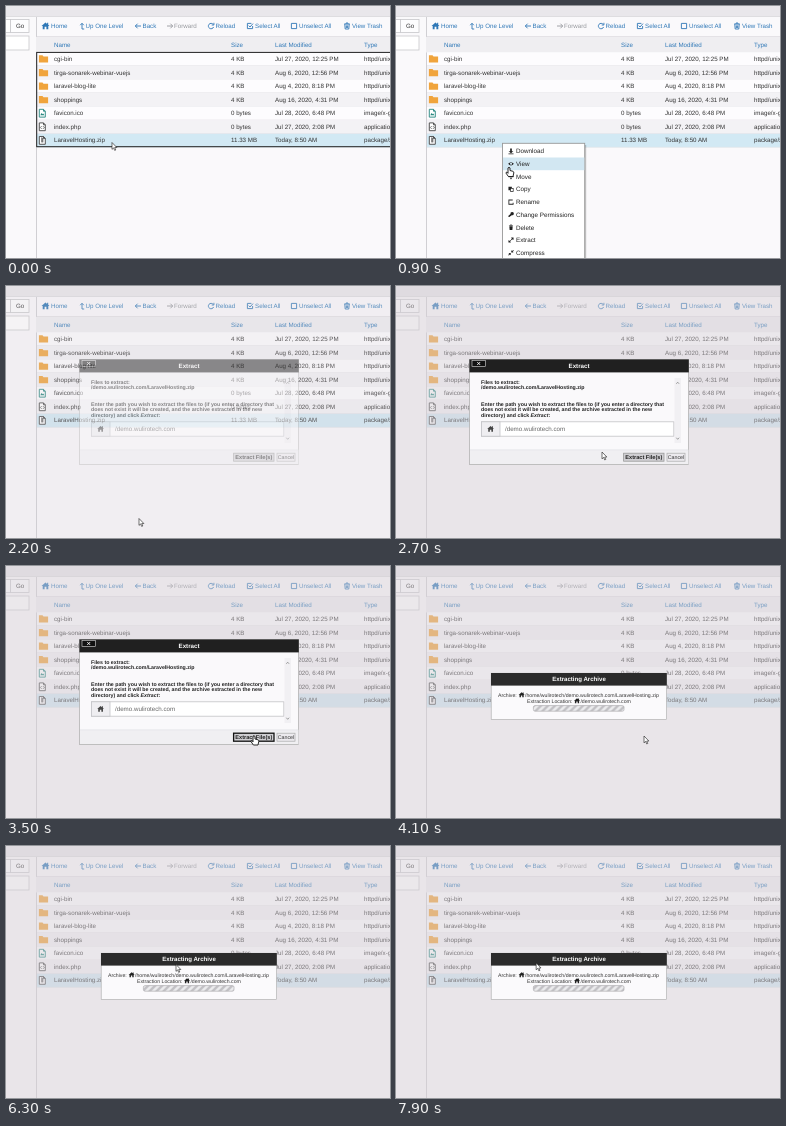
Recreate the animation shown at these times as an HTML page. Size 384x252 px, loop 8 s.

```html
<!DOCTYPE html>
<html lang="en">
<head>
<meta charset="utf-8">
<title>Extracting an archive</title>
<style>
  html, body { margin: 0; width: 100%; height: 100%; overflow: hidden; background: #faf9fb; }
  svg { display: block; width: 384px; height: 252px; }
  text { font-family: "Liberation Sans", Arial, sans-serif; text-rendering: geometricPrecision; white-space: pre; }
</style>
</head>
<body>
<svg id="stage" viewBox="0 0 384 252"></svg>
<script>
const LOOP = 8000;
const BLUE = '#2f78b7';
const DOMAIN = 'demo.wulirotech.com';

const text = (x, y, str, size = 6.2, fill = '#333', extra = '') =>
  `<text x="${x}" y="${y}" font-size="${size}" fill="${fill}" ${extra}>${str}</text>`;
const bold = (x, y, str, size, fill = '#222', extra = '') =>
  text(x, y, str, size, fill, 'font-weight="bold" ' + extra);
const rect = (x, y, w, h, fill, stroke = 'none', extra = '') =>
  `<rect x="${x}" y="${y}" width="${w}" height="${h}" fill="${fill}" stroke="${stroke}" ${extra}/>`;
const path = (x, y, d, fill, stroke = 'none', width = 1, scale = 1) =>
  `<path transform="translate(${x} ${y}) scale(${scale})" d="${d}" fill="${fill}" stroke="${stroke}" stroke-width="${width}"/>`;
const group = (id, content) => `<g id="${id}">${content}</g>`;

// Icon shapes, centred on 0,0
const HOUSE = 'M-4 0L0-3.6 1.6-2.1V-3.2H2.7V-1.2L4 0H2.8V3.2H.9V.8H-.9V3.2H-2.8V0Z';
const ARROW_LEFT = 'M3 0H-2.6M-.4-2.3L-2.7 0-.4 2.3';
const ARROW_RIGHT = 'M-3 0H2.6M.4-2.3L2.7 0 .4 2.3';
const ARROW_UP = 'M2.2 3H0V-2.6M-1.8-.8L0-2.7 1.8-.8';
const RELOAD = 'M2.2-1.6A2.7 2.7 0 1 0 2.6 1M2.9-3.2V-1H.7';
const CHECKED = 'M2.6 0V2.6H-2.6V-2.6H1.4M-1.3-.4L0 1 3-2.4';
const BOX = 'M-2.6-2.6H2.6V2.6H-2.6Z';
const TRASH = 'M-2.2-1.6L-1.8 3H1.8L2.2-1.6M-3-1.9H3M-1-2.1V-3H1V-2.1M-.6-.6V2M.6-.6V2';
const FOLDER = 'M-4.6-3.6H-1L0-2.3H4.6V3.7H-4.6Z';
const PAGE = 'M-3-3.9H1.2L3-2V3.9H-3ZM1.2-3.9V-2H3';

function toolbar() {
  const items = [
    [39.5, 45, 'Home', HOUSE], [76, 79.5, 'Up One Level', ARROW_UP],
    [132, 136.5, 'Back', ARROW_LEFT], [164, 168, 'Forward', ARROW_RIGHT],
    [205, 209.5, 'Reload', RELOAD], [244, 249, 'Select All', CHECKED],
    [288, 293, 'Unselect All', BOX], [341, 346, 'View Trash', TRASH]
  ];
  return items.map(([iconX, x, label, icon]) => {
    const color = label === 'Forward' ? '#96989d' : BLUE;
    const solid = icon === HOUSE;
    return path(iconX, 20, icon, solid ? color : 'none', solid ? 'none' : color, .9) +
      text(x, 22.3, label, 6.2, color);
  }).join('');
}

function fileIcon(kind, y) {
  if (kind === 'folder') return path(37.5, y, FOLDER, '#f0a43c');
  const mark = {
    image: path(36.3, y, 'M-2 2L-.7-.2 .5 1 1.1.3 2 2Z', '#26877f'),
    code: path(36.3, y + .7, 'M-.7-1.3L-2 0-.7 1.3M.7-1.3L2 0 .7 1.3', 'none', '#444', .8),
    zip: path(36.3, y, 'M-.5-3V2M.5-2.5V2', 'none', '#333', .8)
  }[kind];
  return path(36.3, y, PAGE, '#fff', kind === 'image' ? '#26877f' : '#444', .9) + mark;
}

function fileTable() {
  const dir = 'httpd/unix-directory';
  const files = [
    ['folder', 'cgi-bin', '4 KB', 'Jul 27, 2020, 12:25 PM', dir],
    ['folder', 'tirga-sonarek-webinar-vuejs', '4 KB', 'Aug 6, 2020, 12:56 PM', dir],
    ['folder', 'laravel-blog-lite', '4 KB', 'Aug 4, 2020, 8:18 PM', dir],
    ['folder', 'shoppings', '4 KB', 'Aug 16, 2020, 4:31 PM', dir],
    ['image', 'favicon.ico', '0 bytes', 'Jul 28, 2020, 6:48 PM', 'image/x-generic'],
    ['code', 'index.php', '0 bytes', 'Jul 27, 2020, 2:08 PM', 'application/x-httpd-php'],
    ['zip', 'LaravelHosting.zip', '11.33 MB', 'Today, 8:50 AM', 'package/x-generic']
  ];
  const head = rect(30, 31, 354, 15.5, '#efeef1') +
    [[48, 'Name'], [225, 'Size'], [269, 'Last Modified'], [358, 'Type']]
      .map(([x, label]) => text(x, 40.8, label, 6.2, BLUE)).join('');
  return head + files.map(([kind, name, size, date, type], i) => {
    const y = 46.3 + 13.58 * i, base = y + 8.7;
    const fill = i === 6 ? '#d2e9f4' : i % 2 ? '#f3f2f5' : '#fdfcfe';
    return rect(31, y, 354, 13.58, fill) + rect(31, y + 13.1, 354, .5, '#dddce0') +
      fileIcon(kind, y + 6.6) + text(48, base, name) + text(225, base, size) +
      text(269, base, date) + text(358, base, type);
  }).join('');
}

function page() {
  return rect(0, 0, 384, 252, '#faf9fb') + rect(0, 0, 384, 10, '#e9e7eb') +
    rect(0, 10, 384, .7, '#d3d1d6') +
    rect(-5, 13.5, 9.5, 13, '#fff', '#c8c7cb', 'stroke-width=".8"') +
    rect(4.5, 13.5, 18.5, 13, '#fdfdfe', '#c8c7cb', 'stroke-width=".8"') + text(10, 22.3, 'Go', 6.2) +
    rect(-5, 30, 28, 14, '#fff', '#c8c7cb', 'stroke-width=".8"') +
    rect(30, 11, .8, 241, '#c6c5ca') + rect(30, 30.4, 354, .7, '#d6d5d9') +
    toolbar() + fileTable() +
    group('outline', rect(30.7, 46.4, 360, 94.3, 'none', '#222', 'stroke-width="1"'));
}

const MENU_TOP = 138.8, MENU_STEP = 12.7;
function contextMenu() {
  const items = [
    ['Download', 'M-1-3H1V0H2.8L0 2.6-2.8 0H-1ZM-3 2.8H3V3.6H-3Z'],
    ['View', 'M-3.4 0Q0-4 3.4 0Q0 4-3.4 0ZM0-1.2A1.2 1.2 0 1 0 .1-1.2Z'],
    ['Move', 'M0-3.4L1.3-2H.5V-.5H2V-1.3L3.4 0 2 1.3V.5H.5V2H1.3L0 3.4-1.3 2H-.5V.5H-2V1.3L-3.4 0-2-1.3V-.5H-.5V-2H-1.3Z'],
    ['Copy', 'M-3-3H1V-1.4H3V3H-1V1.2H-3ZM-.2-.5V2.2H2.2V-.5Z'],
    ['Rename', 'M-3-2.8H2V-1.8H-2V2.2H2V1H3V3.2H-3Z'],
    ['Change Permissions', 'M-3 1.4L-.6-.8A2 2 0 1 1 .8 .7L-.6 1.8H-1.4V2.8H-3Z'],
    ['Delete', 'M-2.4-2.6H2.4V-1.8H-2.4ZM-2-1.2H2L1.6 3H-1.6ZM-.8-3.3H.8V-2.6H-.8Z'],
    ['Extract', 'M3-3V0L2-1 .8 .2 0-.6 1-1.8 0-3ZM-3 3V0L-2 1-.8-.2 0 .6-1 1.8 0 3Z'],
    ['Compress', 'M.3-.3V-3L1.3-2 2.6-3.2 3.3-2.5 2-1.2 3-.3ZM-.3 .3V3L-1.3 2-2.6 3.2-3.3 2.5-2 1.2-3 .3Z']
  ];
  return rect(108, 139, 82.2, 120, '#000', 'none', 'opacity=".22"') +
    rect(106.5, 137.3, 82.2, 120, '#fff', '#999', 'stroke-width=".9"') +
    rect(107, 0, 81.3, MENU_STEP, '#d2e7f2', 'none', 'id="hover"') +
    items.map(([label, icon], i) => {
      const y = MENU_TOP + MENU_STEP * (i + .5);
      return path(115, y, icon, '#222', 'none', 1, .85) + text(120, y + 2.2, label, 6.3, '#222');
    }).join('');
}

function extractDialog() {
  const lines = [
    [97.6, 'Files to extract:'], [103.2, `/${DOMAIN}/LaravelHosting.zip`],
    [119.6, 'Enter the path you wish to extract the files to (if you enter a directory that'],
    [125.4, 'does not exist it will be created, and the archive extracted in the new'],
    [131.2, 'directory) and click <tspan font-style="italic">Extract</tspan>:']
  ];
  return rect(73.6, 73.6, 219, 104.8, '#faf9fb', '#aaa', 'stroke-width=".7"') +
    rect(73.4, 73.4, 219.4, 13, '#202020') +
    rect(76, 74.6, 13.5, 5.8, '#111', '#ddd', 'stroke-width=".6"') +
    path(82.7, 77.5, 'M-1.4-1.4L1.4 1.4M1.4-1.4L-1.4 1.4', 'none', '#fff', .9) +
    bold(183, 82.3, 'Extract', 6.2, '#fff', 'text-anchor="middle"') +
    lines.map(([y, line]) => bold(85, y, line, 5.25)).join('') +
    rect(278.5, 92, 6.5, 65, '#f1f0f3') +
    path(281.7, 97, 'M-1.4 .8L0-.8 1.4 .8', 'none', '#888', .8) +
    path(281.7, 152.5, 'M-1.4-.8L0 .8 1.4-.8', 'none', '#888', .8) +
    rect(85.4, 135.8, 192.4, 14.4, '#fff', '#c4c3c7', 'stroke-width=".8"') +
    rect(85.4, 135.8, 18.6, 14.4, '#efeef1', '#c4c3c7', 'stroke-width=".8"') +
    path(94.6, 143, HOUSE, '#444', 'none', 1, .85) + text(109, 145, '/' + DOMAIN, 6.2, '#666') +
    rect(74, 164, 218.4, 14, '#f0eff2') + rect(74, 163.6, 218.4, .6, '#dddce0') +
    rect(227.6, 167.2, 40.4, 8, '#d0cfd3', '#999', 'id="submit" stroke-width=".8"') +
    bold(247.8, 173.1, 'Extract File(s)', 5.6, '#222', 'text-anchor="middle"') +
    rect(271, 167.2, 18, 8, '#eceaee', '#aaa', 'stroke-width=".7"') +
    text(280, 173, 'Cancel', 5.3, '#333', 'text-anchor="middle"');
}

function progressDialog() {
  return rect(95.2, 107.2, 175.4, 46.2, '#fbfafc', '#aaa', 'stroke-width=".6"') +
    rect(95, 107, 175.8, 12.6, '#2b2b2b') +
    bold(183, 115.3, 'Extracting Archive', 6.1, '#fff', 'text-anchor="middle"') +
    text(102, 130.8, 'Archive:', 5.2) + path(125.6, 128.9, HOUSE, '#222', 'none', 1, .75) +
    text(129, 130.8, `/home/wulirotech/${DOMAIN}/LaravelHosting.zip`, 5.2) +
    text(131, 136.8, 'Extraction Location:', 5.2) + path(181, 134.9, HOUSE, '#222', 'none', 1, .75) +
    text(184.4, 136.8, '/' + DOMAIN, 5.2) +
    rect(137.4, 139.6, 90.6, 5.6, 'url(#stripes)', '#b0afb2', 'stroke-width=".7" rx="1.6"');
}

const pointers = {
  arrow: path(0, 0, 'M0 0V7.6L1.8 6 3 8.8 4.2 8.3 3 5.6H5.4Z', '#fff', '#222', .7, .9),
  hand: path(0, 0, 'M-1 4.6V.4Q0-.7 1 .4V3L4 3.8Q5 4.2 4.8 5.4L4 9H-.6L-3 5.6Q-3 4.4-2 4.6L-1 5.8Z', '#fff', '#111', .9),
  beam: path(0, 0, 'M-1.6-3.8H1.6M0-3.8V3.8M-1.6 3.8H1.6', 'none', '#444', .7)
};

const stage = document.getElementById('stage');
stage.innerHTML = `<defs><pattern id="stripes" width="7" height="7" patternUnits="userSpaceOnUse">
    ${rect(0, 0, 7, 7, '#ececee')}<path d="M0 7L7 0M-3.5 3.5L3.5-3.5M3.5 10.5L10.5 3.5" stroke="#c2c1c5" stroke-width="2.4"/>
  </pattern></defs>` +
  page() + group('menu', contextMenu()) +
  group('mask', rect(0, 0, 384, 252, '#d2cdd2', 'none', 'opacity=".45"')) +
  group('extract', extractDialog()) + group('progress', progressDialog()) +
  group('pointer', Object.entries(pointers).map(([id, shape]) => group(id, shape)).join(''));

const $ = id => document.getElementById(id);
const show = (id, visible) => $(id).setAttribute('visibility', visible ? 'inherit' : 'hidden');
const ramp = (from, to, t) => Math.min(1, Math.max(0, (t - from) / (to - from)));

// time, x, y
const route = [
  [0, 106, 136.5], [600, 106, 136.5], [1500, 133, 233], [2250, 133, 232.5], [2600, 200, 166],
  [2700, 206, 166], [3200, 248, 170], [4450, 248, 170], [4900, 190, 136.5], [5400, 190, 136.5],
  [5900, 170, 118.5], [6400, 170, 118.5], [6900, 162, 112], [7600, 141, 116.5], [8000, 140, 117]
];

function pointerAt(t) {
  const i = route.findIndex(stop => stop[0] > t);
  const [t0, x0, y0] = route[i - 1], [t1, x1, y1] = route[i];
  const p = ramp(t0, t1, t), eased = p * p * (3 - 2 * p);
  return [x0 + (x1 - x0) * eased, y0 + (y1 - y0) * eased];
}

function pointerKind(t) {
  if (t >= 700 && t < 1800 || t >= 3100 && t < 4000) return 'hand';
  return t >= 4800 && t < 5600 ? 'beam' : 'arrow';
}

function draw(now) {
  const t = Math.floor(now % LOOP / 100) * 100;
  const [x, y] = pointerAt(t);

  show('outline', t < 300);
  show('menu', t >= 300 && t < 1800);
  show('hover', t >= 700 && t < 1800 && y > MENU_TOP);
  $('hover').setAttribute('y', MENU_TOP + MENU_STEP * Math.floor((y - MENU_TOP) / MENU_STEP));

  const opening = ramp(1850, 2550, t), closing = ramp(3600, 4000, t);
  $('mask').setAttribute('opacity', opening);
  $('extract').setAttribute('opacity', opening * (1 - closing));
  $('progress').setAttribute('opacity', closing);
  $('submit').setAttribute('stroke', t >= 3300 ? '#111' : '#999');
  $('submit').setAttribute('stroke-width', t >= 3300 ? 1.3 : .8);
  $('stripes').setAttribute('patternTransform', `translate(${-t * .014} 139)`);

  $('pointer').setAttribute('transform', `translate(${x} ${y})`);
  for (const kind in pointers) show(kind, kind === pointerKind(t));
  requestAnimationFrame(draw);
}
requestAnimationFrame(draw);
</script>
</body>
</html>
```
